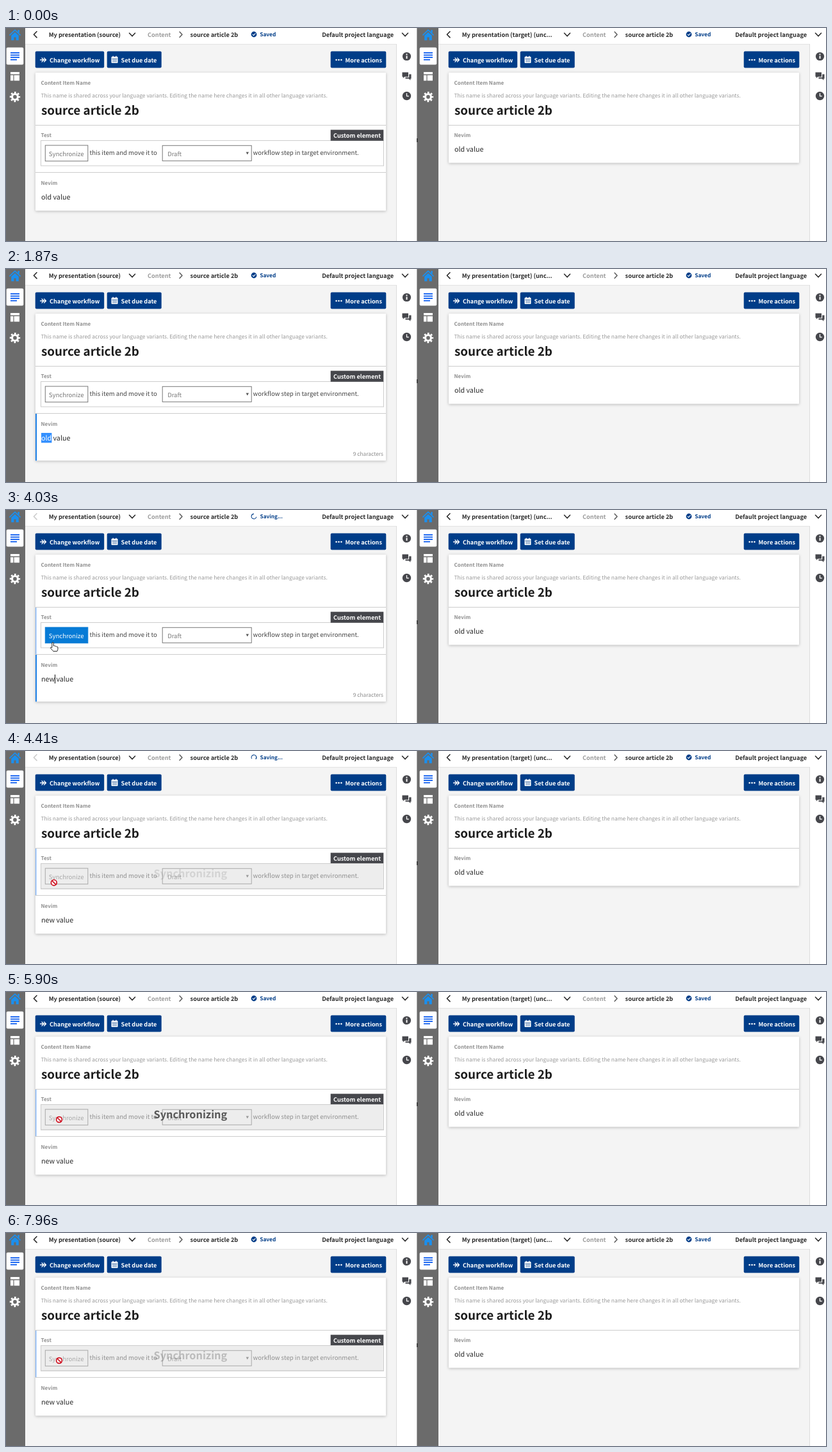
Recreate the animation shown at these times as an HTML page. Size 1280 by 334 pixels, loop 8000 ms.

```html
<!DOCTYPE html>
<html lang="en">
<head>
<meta charset="utf-8">
<title>Content synchronization</title>
<style>
html, body { margin: 0; width: 100%; height: 100%; overflow: hidden; background: #f4f4f4; }
svg { display: block; width: 100vw; height: 100vh; }
text { font-family: "Noto Sans CJK JP", "Noto Sans CJK SC", "Noto Sans CJK", "Open Sans", sans-serif; text-rendering: geometricPrecision; white-space: pre; }
.card { fill: #fff; filter: drop-shadow(0 1px 2px rgba(0, 0, 0, .25)); }
.line { fill: none; stroke-linecap: round; stroke-linejoin: round; }
</style>
</head>
<body>
<svg id="stage" viewBox="0 0 1280 334" xmlns="http://www.w3.org/2000/svg"></svg>
<script>
const LOOP = 8000;
const NAVY = '#003d88', INK = '#2b2b2b', GREY = '#8f8f8f', DARK = '#46474c', SIDE = '#6b6b6b';
const VALUE_X = 55;

const rect = (x, y, w, h, fill, extra = '') =>
  `<rect x="${x}" y="${y}" width="${w}" height="${h}" fill="${fill}" ${extra}/>`;
const text = (x, y, size, fill, str, bold, extra = '') =>
  `<text x="${x}" y="${y}" font-size="${size}" fill="${fill}" font-weight="${bold ? 700 : 400}" ${extra}>${str}</text>`;
const line = (d, color, width, extra = '') =>
  `<path class="line" d="${d}" stroke="${color}" stroke-width="${width}" ${extra}/>`;
const shape = (d, fill) => `<path d="${d}" fill="${fill}"/>`;
const dot = (x, y, r, fill) => `<circle cx="${x}" cy="${y}" r="${r}" fill="${fill}"/>`;
const chevron = x => line(`M${x - 4.5} 8l4.5 4.8 4.5-4.8`, INK, 1.6);
const label = (y, str) => text(54.5, y, 8.12, GREY, str, true);

function sidebar() {
  const gear = (r, w, dash) =>
    `<circle cx="14" cy="108" r="${r}" fill="none" stroke="#fff" stroke-width="${w}" stroke-dasharray="${dash}" stroke-dashoffset="1.3"/>`;
  return rect(0, 0, 30, 334, SIDE) +
    line('M6 10.8L14 3.2l8 7.6', '#1b8fee', 1.8) + rect(18.4, 3, 2.4, 4.5, '#1b8fee') +
    shape('M8.2 11.8L14 6.4l5.8 5.4V19.3h-4.2v-4.8h-3.2v4.8H8.2Z', '#1b8fee') +
    rect(.7, 30.5, 26.6, 27, '#fff', 'rx="2"') +
    [38, 41.6, 45.2].map(y => rect(7, y, 14, 1.8, '#0b5cf0')).join('') +
    rect(7, 48.8, 10, 1.8, '#0b5cf0') +
    rect(7, 69, 14, 3.6, '#fff') + rect(7, 74, 4.4, 8.6, '#fff') + rect(12.6, 74, 8.4, 8.6, '#fff') +
    gear(4.5, 3.2, 'none') + gear(6.8, 2.8, '2.67 2.67');
}

function rail() {
  return rect(610, 25, 31, 309, '#fff') + rect(609, 25, 1, 309, '#dcdcdc') +
    dot(625.5, 44.5, 6.6, DARK) + rect(624.6, 43.6, 1.9, 4.6, '#fff') + dot(625.5, 41.4, 1.1, '#fff') +
    shape('M618.5 69.5h9.5v7h-6l-2.2 2.2v-2.2h-1.3Z M629.2 72.5h3.3v7h-1.2v2.4l-2.4-2.4h-5.4v-1.9h5.7Z', DARK) +
    dot(625.5, 106.5, 6.7, DARK) + line('M625.5 102.6v4.2h3', '#fff', 1.3);
}

function actions() {
  const button = (x, w, textX, str) =>
    rect(x, 36.5, w, 26, NAVY, 'rx="2"') + text(textX, 53.6, 9.1, '#fff', str, true);
  return button(45.7, 107.5, 68, 'Change workflow') +
    button(157.7, 85, 179.6, 'Set due date') +
    button(506.7, 86.6, 529.6, 'More actions') +
    line('M53.5 50h8.6M56 47l3 3-3 3M59.5 47l3 3-3 3', '#fff', 1.3) +
    rect(164.5, 45, 10, 10, '#fff', 'rx="1"') + rect(165.6, 48, 7.8, .8, NAVY) +
    rect(166.4, 43.8, 1.4, 2, '#fff') + rect(171.2, 43.8, 1.4, 2, '#fff') +
    [50, 52.2].map(y => [166.6, 168.9, 171.2].map(x => rect(x, y, 1.3, 1.2, NAVY)).join('')).join('') +
    [515.6, 519.5, 523.4].map(x => dot(x, 50, 1.3, '#fff')).join('');
}

const savedBadge = x => dot(x, 10, 4.4, NAVY) + line(`M${x - 2} 10.2l1.5 1.5 2.7-3`, '#fff', 1.1) +
  text(x + 9.2, 13.2, 8.35, NAVY, 'Saved', true);

// "shift" moves everything after the title to the right
function header(title, shift, status, backId = '') {
  return rect(30, 0, 611, 25, '#fff') + rect(30, 25, 611, 1, '#e3e3e3') +
    line('M48 5.5l-4.6 4.7 4.6 4.7', INK, 1.6, backId) +
    text(66.7, 14, 9.2, INK, title, true) +
    chevron(197 + shift) +
    text(221 + shift, 14, 9.2, '#9b9b9b', 'Content', true) +
    line(`M${271 + shift} 6l4 4.2-4 4.2`, '#555', 1.4) +
    text(287.6 + shift, 14, 9.2, INK, 'source article 2b', true) +
    status +
    text(493.2, 14, 9.25, INK, 'Default project language', true) + chevron(623);
}

function itemName() {
  return label(89.4, 'Content Item Name') +
    text(54.5, 109, 8.46, '#999', 'This name is shared across your language variants. Editing the name here changes it in all other language variants.') +
    text(54.9, 136.4, 18.85, '#1c1c1c', 'source article 2b', true) +
    rect(46, 152, 547, 1, '#ccc');
}

function customElement() {
  return label(171.3, 'Test') +
    rect(54.5, 176.5, 535, 39.5, '#fff', 'stroke="#ccc"') +
    rect(506.7, 159.6, 82.6, 17.2, DARK) + text(511, 172, 9.2, '#fff', 'Custom element', true) +
    rect(61.3, 184, 66.5, 24.7, '#fff', 'id="syncBox" stroke="#777"') +
    text(66.8, 200.6, 9.55, '#777', 'Synchronize', false, 'id="syncText"') +
    text(130.6, 199.3, 9.6, '#444', 'this item and move it to') +
    rect(244.2, 184.3, 139, 24, '#fff', 'stroke="#777"') +
    text(252.2, 200.6, 9.45, '#777', 'Draft') +
    shape('M374.6 194.5h4.4l-2.2 4Z', '#555') +
    text(385.6, 199.3, 9.62, '#444', 'workflow step in target environment.') +
    `<g id="overlay">${rect(54, 176, 536, 40.5, '#dcdcdc', 'opacity=".5"')}
     ${rect(54.5, 176.5, 535, 39.5, 'none', 'stroke="#ccc"')}
     ${text(230.6, 198.2, 16.25, '#4a4a4a', 'Synchronizing', true, 'id="pulse"')}</g>`;
}

const pointers = `
  <g id="arrow"><path d="M0 0V11.5L2.7 9 4.5 13 6.2 12.2 4.5 8.4H8Z" fill="#fff" stroke="#111" stroke-width=".9"/></g>
  <g id="beam">${line('M-2-6h4M-2 6h4M0-6V6', '#222', 1)}</g>
  <g id="hand"><path d="M-1.3 7.5V1A1.2 1.2 0 0 1 1.2 1V5.2Q2.6 4.4 3.5 5.6 5 5 5.7 6.4 7.6 6 7.8 8V10.5Q7.6 12 6.7 13.6H.6Q-.2 12.4-1.4 11.2L-3.8 8.4Q-3.6 6.6-1.3 8Z" fill="#fff" stroke="#111" stroke-width=".9" stroke-linejoin="round"/></g>
  <g id="denied"><circle r="4.4" fill="#fff" stroke="#cf1020" stroke-width="1.7"/>${line('M-3-3L3 3', '#cf1020', 1.7)}</g>`;

const status = `<g id="saved">${savedBadge(387)}</g>
  <g id="saving"><circle id="spin" cx="387" cy="10" r="3.9" fill="none" stroke="${NAVY}" stroke-width="1.1" stroke-dasharray="17 7.5"/>
  ${text(396.6, 13.2, 8.2, NAVY, 'Saving...', true)}</g>`;

const sourcePane = rect(30, 0, 611, 334, '#f4f4f4') +
  header('My presentation (source)', 0, status, 'id="back"') + actions() +
  '<rect id="card" class="card" x="46" y="70" width="547" height="216.5" rx="1"/>' +
  itemName() + customElement() + rect(46, 226, 547, 1, '#ccc') + label(246.2, 'Nevim') +
  rect(46, 153, 1.4, 73, '#7fb2f7', 'id="hoverTest"') +
  rect(46, 227, 1.4, 59.5, '#7fb2f7', 'id="hoverValue"') +
  rect(46, 227, 2, 73.5, '#1b7fe6', 'id="focusBar"') +
  rect(55, 257, 16.4, 15.5, '#3390ff', 'id="mark"') +
  text(VALUE_X, 269.2, 10.7, INK, '<tspan id="word">old</tspan> value') +
  rect(76, 258, 1, 14, '#111', 'id="caret"') +
  text(589, 292.6, 8.4, '#8a8a8a', '', false, 'id="count" text-anchor="end"') + rail() + sidebar();

const targetPane = rect(30, 0, 611, 334, '#f4f4f4') +
  header('My presentation (target) (unc...', 34, savedBadge(421)) + actions() +
  '<rect class="card" x="46" y="70" width="547" height="141.5" rx="1"/>' +
  itemName() + label(171.3, 'Nevim') + text(VALUE_X, 194.2, 10.7, INK, 'old value') + rail() + sidebar();

document.getElementById('stage').innerHTML = sourcePane +
  `<g transform="translate(645 0)">${targetPane}</g>` +
  rect(641, 0, 1, 334, '#a5a5a5') + rect(642, 0, 3, 334, SIDE) + rect(641, 173, 2, 6, '#444') + pointers;

const ui = {};
document.querySelectorAll('[id]').forEach(el => ui[el.id] = el);

const show = (el, on) => el.setAttribute('visibility', on ? 'visible' : 'hidden');
const set = (el, attrs) => { for (const k in attrs) el.setAttribute(k, attrs[k]); };
const during = (t, a, b) => t >= a && t < b;

// Pointer stops: time, x, y
const enter = [[750, 150, 334], [1000, 118, 300], [1410, 62, 265]];
const leave = [[3530, 62, 266], [3950, 73, 208], [4330, 74, 207], [4770, 83, 200]];

function along(stops, t) {
  const i = stops.findIndex(s => s[0] > t);
  if (i < 0) return stops[stops.length - 1].slice(1);
  const [a, b] = [stops[Math.max(i - 1, 0)], stops[i]];
  const p = Math.max(0, (t - a[0]) / (b[0] - a[0] || 1));
  const e = p * p * (3 - 2 * p);
  return [a[1] + (b[1] - a[1]) * e, a[2] + (b[2] - a[2]) * e];
}

function typedWord(t) {
  if (t < 2470) return 'old';
  return 'new'.slice(0, t < 2690 ? 1 : t < 2770 ? 2 : 3);
}

function render(t) {
  const focused = during(t, 1640, 4410), syncing = t >= 4410;
  const saving = during(t, 3530, 4570), selected = during(t, 1870, 2470);

  const word = typedWord(t);
  if (ui.word.textContent !== word) ui.word.textContent = word;
  ui.word.setAttribute('fill', selected ? '#fff' : INK);
  show(ui.mark, selected);
  ui.count.textContent = focused ? word.length + 6 + ' characters' : '';
  ui.card.setAttribute('height', focused ? 230.5 : 216.5);
  show(ui.focusBar, focused);

  const blinkOn = t < 2770 || Math.floor((t - 2770) / 525) % 2 === 0;
  show(ui.caret, during(t, 2470, 4410) && blinkOn);
  ui.caret.setAttribute('x', Math.round(VALUE_X + ui.word.getComputedTextLength()));

  show(ui.saved, !saving);
  show(ui.saving, saving);
  ui.spin.setAttribute('transform', `rotate(${t * .36 % 360} 387 10)`);
  ui.back.setAttribute('stroke', saving ? '#ccc' : INK);

  const visible = during(t, 750, 1640) || t >= 3530;
  const [x, y] = along(t < 3530 ? enter : leave, t);
  const onButton = visible && !syncing && during(y, 184, 210) && x < 128;
  const onText = during(y, 256, 274) && x < 105;
  const kind = !visible ? '' : syncing ? 'denied' : onButton ? 'hand' : onText ? 'beam' : 'arrow';
  for (const k of ['arrow', 'beam', 'hand', 'denied']) {
    show(ui[k], k === kind);
    ui[k].setAttribute('transform', `translate(${x} ${y})`);
  }
  show(ui.hoverTest, visible && y < 226);
  show(ui.hoverValue, visible && !focused && during(y, 227, 287));

  set(ui.syncBox, onButton ? { fill: '#077bd6', stroke: '#077bd6' } : { fill: '#fff', stroke: '#777' });
  ui.syncText.setAttribute('fill', onButton ? '#fff' : '#777');

  show(ui.overlay, syncing);
  const wave = (1 - Math.cos((t - 4200) / 3250 * 2 * Math.PI)) / 2;
  ui.pulse.setAttribute('opacity', .12 + .8 * wave);
}

function tick(now) {
  render(now % LOOP);
  requestAnimationFrame(tick);
}
render(0);
requestAnimationFrame(tick);
</script>
</body>
</html>
```
